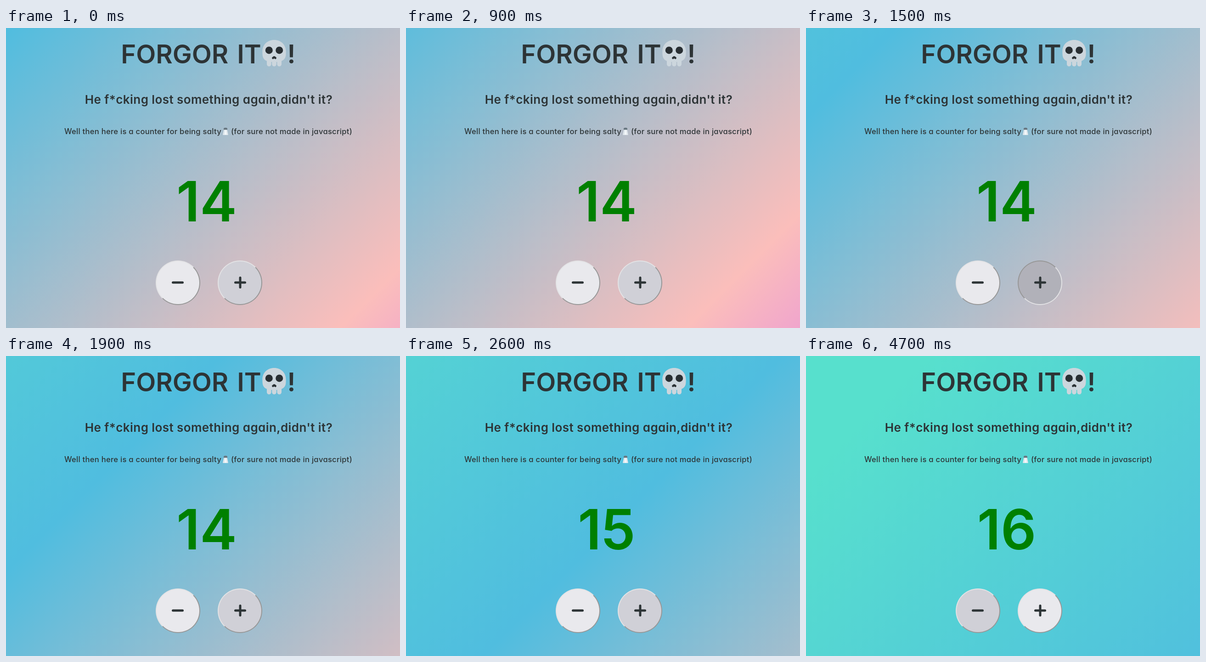
An HTML page for the animation above (4900 ms loop, 858 px wide and 653 px high).

```html
<!DOCTYPE html>
<html lang="en">
<head>
<meta charset="utf-8">
<title>Salt counter</title>
<style>
  html, body { margin: 0; width: 100%; height: 100%; overflow: hidden; }
  #stage { position: relative; width: 858px; height: 653px; overflow: hidden; }
  svg { position: absolute; left: 0; top: 0; }
  text {
    font-family: Poppins, Inter, "Open Sans", sans-serif;
    font-feature-settings: "cv11";
    font-weight: 600;
    text-anchor: middle;
    fill: #2d3436;
  }
  .title { font-size: 56px; word-spacing: 5px; }
  .sub { font-size: 26px; letter-spacing: .016em; }
  .note { font-size: 16.6px; font-weight: 500; letter-spacing: .016em; }
  #count { font-size: 121px; fill: #008000; }
  .sign { fill: none; stroke: #2d3436; stroke-width: 5; stroke-linecap: round; }
  .key {
    position: absolute; top: 505.5px; width: 97px; height: 97px;
    box-sizing: border-box; border-radius: 50%;
    border: 2px solid; border-color: #e3e3e5 #979797 #979797 #e3e3e5;
    background: #e9e9ed;
  }
  .key.hover { background: #d0d0d7; }
  .key.down { background: #b1b1b9; border-color: #979797 #e3e3e5 #e3e3e5 #979797; }
  #minus { left: 325.5px; }
  #plus { left: 461px; }
</style>
</head>
<body>
<div id="stage">
  <div id="minus" class="key"></div>
  <div id="plus" class="key"></div>
  <svg width="858" height="653">
    <text class="title" x="403" y="77">FORGOR IT</text>
    <text class="title" x="621.5" y="77">!</text>
    <g transform="translate(555.2 26) scale(1.6)">
      <path fill="#ccd6dd" d="M34 16C34 6 26.8 0 18 0S2 6 2 16c0 5.6 0 10.4 6 12.6V33a3 3 0 0 0 6 0v-3.2l1 .1V33a3 3 0 0 0 6 0v-3.1l1-.1V33a3 3 0 0 0 6 0v-4.4c6-2.2 6-7 6-12.6z"/>
      <g fill="#292f33">
        <circle cx="11" cy="14" r="5"/>
        <circle cx="25" cy="14" r="5"/>
        <path d="M19.9 23.1a2 1.6 0 0 0-3.8 0a1.5 1.5 0 1 0 1.8 1.9h.2a1.5 1.5 0 1 0 1.8-1.9z"/>
      </g>
    </g>
    <text class="sub" x="441.5" y="165">He f*cking lost something again,didn't it?</text>
    <text class="note" x="298" y="231">Well then here is a counter for being salty</text>
    <path fill="#e1e8ed" d="M474.5 221h7l2.3 11q0 1-1 1h-9.6q-1 0-1-1z"/>
    <path fill="#f5f8fa" d="M477 222h2.5l.8 10h-4z"/>
    <path fill="#66757f" d="M474 221.500v-2.5q0-2 4-2t4 2v2.5z"/>
    <text class="note" x="622" y="231">(for sure not made in javascript)</text>
    <text id="count" x="437" y="421">14</text>
    <path class="sign" d="M363.5 554h21M499.5 554h21M510 543.5v21"/>
  </svg>
</div>
<script>
const LOOP = 4900;
const GAP = 1380;
const get = id => document.getElementById(id);
const stage = get('stage'), count = get('count'), minus = get('minus'), plus = get('plus');

// [time, x + y of the blue band]
const drift = [[0, 0], [300, -95], [600, -135], [900, -118], [1200, 15], [1500, 195],
  [1900, 470], [2600, 820], [4000, 1430], [4400, 1565], [4700, 1640]];

// The picture advances in 100 ms ticks, then in a few long holds.
function tick(t) {
  if (t < 2600) return Math.floor(t / 100) * 100;
  return [4700, 4400, 4000, 2600].find(start => t >= start);
}

function bluePos(t) {
  const i = Math.max(1, drift.findIndex(([time]) => time >= t));
  const [t0, a] = drift[i - 1], [t1, b] = drift[i];
  return a + (b - a) * (t - t0) / (t1 - t0);
}

function draw(t) {
  const blue = bluePos(t);
  const stop = (color, sum) => `${color} ${(sum / Math.SQRT2).toFixed(2)}px`;
  stage.style.background = `linear-gradient(135deg, ${[
    stop('#57e0cd', blue - GAP),
    stop('#50bddf', blue),
    stop('#fbbebb', blue + GAP),
    stop('#eea0d0', blue + GAP + 300)
  ]})`;
  count.textContent = t < 2200 ? 14 : t < 4000 ? 15 : 16;
  plus.classList.toggle('hover', t < 4400);
  plus.classList.toggle('down', t >= 1400 && t < 1700);
  minus.classList.toggle('hover', t >= 4700);
}

const start = performance.now();
function frame() {
  draw(tick((performance.now() - start) % LOOP));
  requestAnimationFrame(frame);
}
frame();
</script>
</body>
</html>
```
